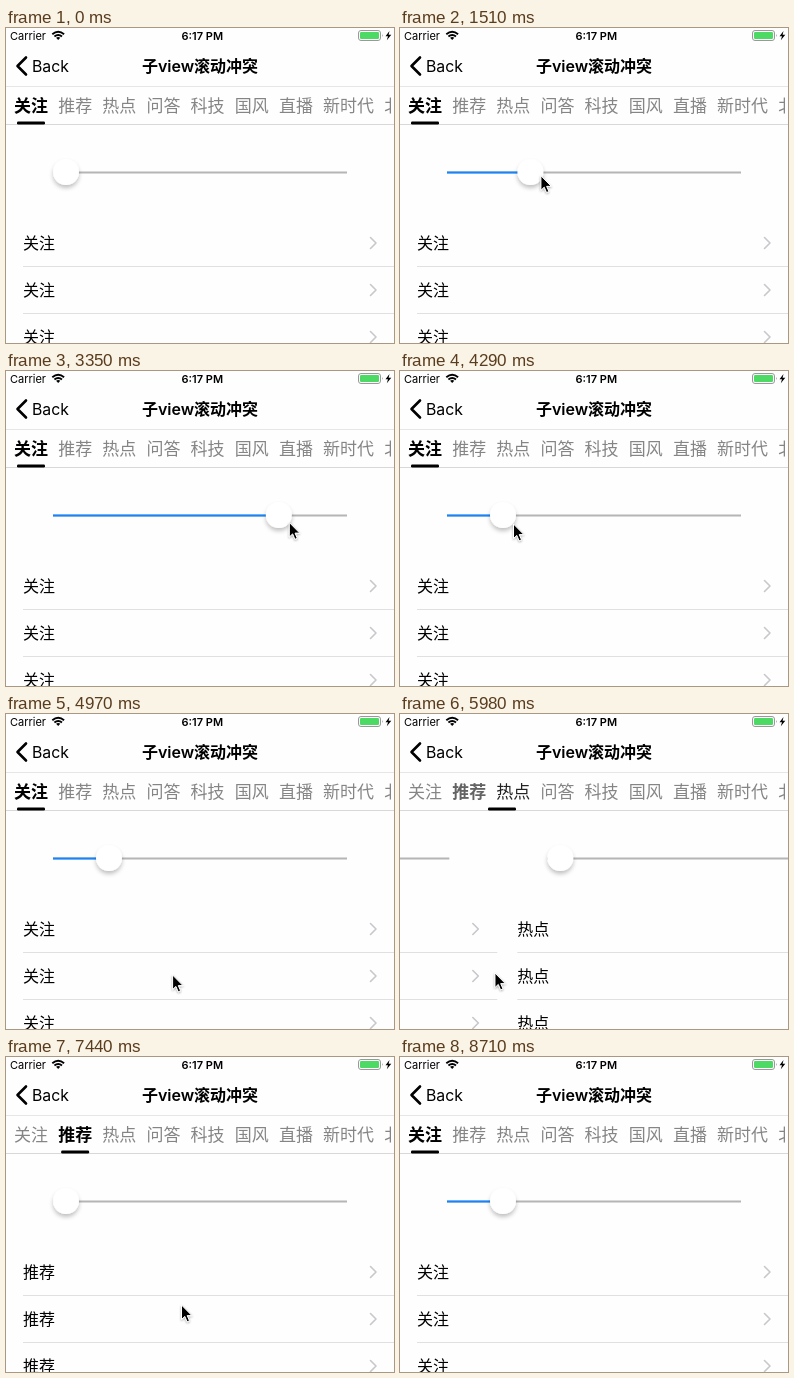
These frames come from a looping animation (388 by 315 pixels, 9.36 s). An HTML page:

```html
<!DOCTYPE html>
<html lang="zh-CN">
<head>
<meta charset="utf-8">
<title>Nested scrolling</title>
<style>
  html, body { margin: 0; width: 100%; height: 100%; overflow: hidden; background: #fefefe; }
  svg { display: block; }
  text { font-family: Inter, "Noto Sans CJK SC", "Noto Sans CJK", sans-serif; }
  .tab { font-size: 17px; }
  .row { font-size: 16px; }
  .line { fill: none; stroke-linecap: round; stroke-linejoin: round; }
</style>
</head>
<body>
<svg id="stage" width="388" height="315" viewBox="0 0 388 315">
  <defs>
    <filter id="shadow" x="-50%" y="-50%" width="200%" height="200%">
      <feDropShadow dx="0" dy="3" stdDeviation="2.2" flood-color="#000" flood-opacity=".24"/>
    </filter>
    <filter id="cursorShadow" x="-50%" y="-50%" width="200%" height="200%">
      <feDropShadow dx="0" dy="1" stdDeviation=".8" flood-color="#000" flood-opacity=".35"/>
    </filter>
  </defs>
  <rect width="388" height="315" fill="#fefefe"/>
  <g id="pages"></g>

  <text x="4" y="12" font-size="11">Carrier</text>
  <g fill="none" stroke="#000" stroke-width="1.9">
    <path d="M46.3 6.2Q52.2 1.2 58.1 6.2M48.4 8.5Q52.2 5.4 56 8.5"/>
    <path d="M50.1 9.8Q52.2 8.3 54.3 9.8L52.2 12Z" fill="#000" stroke="none"/>
  </g>
  <text x="196.3" y="12" font-size="11" font-weight="600" text-anchor="middle">6:17 PM</text>
  <rect x="352.5" y="2.5" width="22" height="10" rx="2.5" fill="none" stroke="#999"/>
  <rect x="354" y="4" width="19" height="7" rx="1.2" fill="#4cd964"/>
  <path d="M376 6q1.6 1.5 0 3z" fill="#999"/>
  <path d="M383.5 3L379.5 8.3H382L380.8 12.3L385.3 6.7H382.6Z"/>

  <path class="line" d="M20 29.5L11.5 38L20 46.5" stroke="#000" stroke-width="2.6"/>
  <text x="26" y="43.5" font-size="15.8">Back</text>
  <text x="194" y="44" font-size="16" font-weight="600" text-anchor="middle">子view滚动冲突</text>
  <path d="M0 58.5H388" stroke="#e6e6e6"/>
  <path d="M0 96.5H388" stroke="#d8d8d8"/>
  <svg id="tabs" width="386" height="100"></svg>
  <rect id="underline" y="93.5" width="28" height="3" rx="1.2"/>

  <path id="cursor" d="M0 0V14.5L3.3 11.4L5.6 16.8L8 15.8L5.7 10.6H10.4Z"
        stroke="#fff" filter="url(#cursorShadow)"/>
</svg>
<script>
const LOOP = 9360, PITCH = 392, TAB_STEP = 44.15, SLIDER_MIN = 60;
const TABS = ['关注', '推荐', '热点', '问答', '科技', '国风', '直播', '新时代', '北京'];
const $ = id => document.getElementById(id);

function add(parent, name, attrs, text = '') {
  const node = document.createElementNS('http://www.w3.org/2000/svg', name);
  for (const key in attrs) node.setAttribute(key, attrs[key]);
  node.textContent = text;
  return parent.appendChild(node);
}

// A third character pushes the following tab along by one glyph.
let tabX = 8;
const tabs = TABS.map(name => {
  const tab = add($('tabs'), 'text', { class: 'tab', x: tabX, y: 84 }, name);
  tabX += TAB_STEP + 17 * (name.length - 2);
  return tab;
});

function makePage(name) {
  const group = add($('pages'), 'g', {});
  add(group, 'path', { d: 'M47 144.5H341', stroke: '#b5b5b5', 'stroke-width': 1.9 });
  const fill = add(group, 'path', { stroke: '#1585ff', 'stroke-width': 1.9 });
  const thumb = add(group, 'circle', { cy: 144, r: 13, fill: '#fff', filter: 'url(#shadow)' });
  for (let y = 215; y < 315; y += 47) {
    add(group, 'text', { class: 'row', x: 17, y: y + 6 }, name);
    add(group, 'path', { class: 'line', d: `M364.5 ${y - 5.5}l5.5 5.5l-5.5 5.5`, stroke: '#c7c7cc', 'stroke-width': 1.6 });
    add(group, 'path', { d: `M17 ${y + 23.5}H389`, stroke: '#e0e0e2' });
  }
  const setSlider = x => {
    thumb.setAttribute('cx', x);
    fill.setAttribute('d', x > SLIDER_MIN ? `M47 144.5H${x}` : '');
  };
  setSlider(SLIDER_MIN);
  return { group, setSlider };
}
const pages = TABS.slice(0, 3).map(makePage);

const clamp = u => Math.max(0, Math.min(1, u));
const easeInOut = u => (1 - Math.cos(Math.PI * u)) / 2;
const easeOut = u => 1 - (1 - u) ** 2.34;

// Eases between stops of the form [time, ...values].
function sample(stops, t) {
  const i = Math.max(0, stops.findLastIndex(stop => stop[0] <= t));
  const a = stops[i], b = stops[i + 1] || a;
  const u = easeInOut(clamp((t - a[0]) / (b[0] - a[0] || 1)));
  return a.slice(1).map((v, k) => v + (b[k + 1] - v) * u);
}

// Turning points of the slider drag.
const thumbStops = [[1250, SLIDER_MIN], [1770, 200], [2450, 107], [3370, 273], [3840, 103]];

// The hand waits, strokes, and the page follows shortly after.
const WAIT = 290, STROKE = 260, LAG = 120, SETTLE = 410, REACH = 120;
const swipes = [
  { start: 4855, x: 216, y: 261, step: 1 },
  { start: 5680, x: 214, y: 259, step: 1 },
  { start: 6710, x: 121, y: 260, step: -1 },
  { start: 7730, x: 175, y: 248, step: -1 }
];

const SHOW = 470, HIDE = 8710;
const cursorStops = [
  [SHOW, 309, 312], [1000, 70, 147],
  ...thumbStops.map(([t, x], i) => [t, x + 10, 147 + 1.5 * i]),
  [4290, 113, 153],
  ...swipes.flatMap(({ start, x, y, step }) => [
    [start - WAIT, x, y], [start, x, y], [start + STROKE, x - REACH * step, y]
  ]),
  [HIDE - 30, 383, 309]
];

function scrollAt(t) {
  let position = 0, settled = 0;
  for (const { start, step } of swipes) {
    const u = clamp((t - start - LAG) / SETTLE);
    position += step * easeOut(u);
    settled += step * Math.floor(u);
  }
  return { position, settled };
}

function render(t) {
  const { position, settled } = scrollAt(t);
  pages.forEach(({ group }, i) =>
    group.setAttribute('transform', `translate(${(i - position) * PITCH})`));
  pages[0].setSlider(sample(thumbStops, t)[0]);

  tabs.forEach((tab, i) => {
    const shade = Math.round(133 * clamp(Math.abs(i - position)));
    tab.setAttribute('fill', `rgb(${shade},${shade},${shade})`);
    tab.setAttribute('font-weight', i === settled ? 600 : 400);
  });
  $('underline').setAttribute('x', 11 + TAB_STEP * position);

  const [x, y] = sample(cursorStops, t);
  $('cursor').setAttribute('transform', `translate(${x + 0.5} ${y})`);
  $('cursor').setAttribute('visibility', t >= SHOW && t < HIDE ? 'visible' : 'hidden');
}

const startTime = performance.now();
function tick() {
  render((performance.now() - startTime) % LOOP);
  requestAnimationFrame(tick);
}
tick();
</script>
</body>
</html>
```
